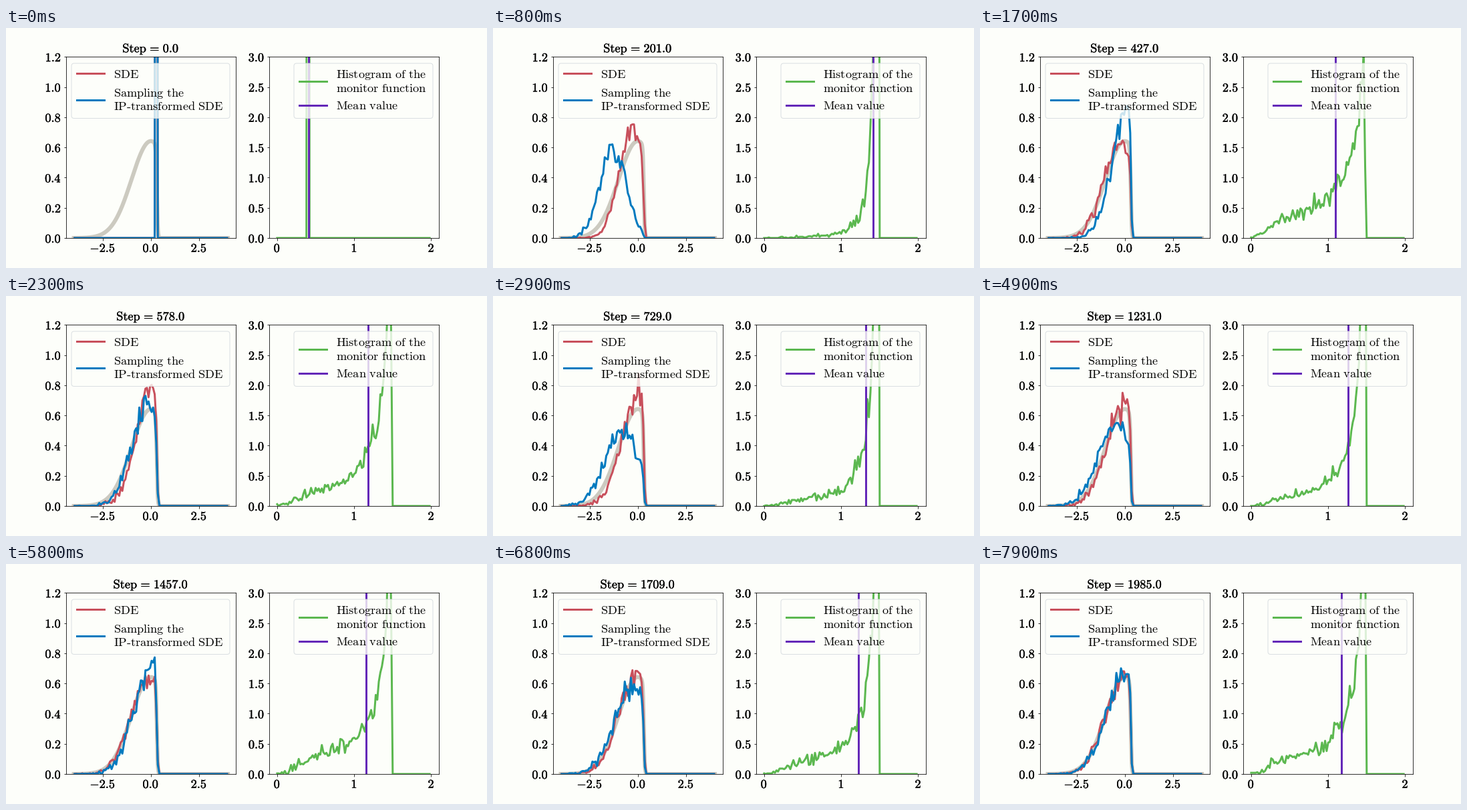
These frames come from a looping animation (720x360 px, 8 s). A matplotlib script:

```python
import matplotlib.pyplot as plt
import numpy as np
from matplotlib import patheffects
from matplotlib.animation import FuncAnimation
from matplotlib.patches import FancyBboxPatch

plt.rcParams["mathtext.fontset"] = "cm"

BG = "#fdfefa"
RED, BLUE, GREEN, PURPLE = "#c8505c", "#007abf", "#5cb850", "#6428b8"
GREY = "#cccac0"
FRAMES, INTERVAL = 80, 100
SAMPLES = 5000
SIZE = 18.3
START = 0.245

grid = np.linspace(-4, 4, 2001)
x_edges = np.linspace(-4, 4, 101)
x_mid = (x_edges[1:] + x_edges[:-1]) / 2
g_edges = np.linspace(0, 2, 101)
wall = np.where(grid < 0.44, 1 / (1 + np.exp((grid - 0.31) / 0.025)), 0)


def swing(step, period, decay, lean, reach):
    """Centre of a cloud that rebounds from the wall and settles at 0."""
    return np.exp(-step / decay) * (reach * np.cos(2 * np.pi * step / period) - lean)


def spread(step):
    return (1 - 0.2 * np.exp(-step / 900)) * (1 - np.exp(-step / 120))


def density(centre, width):
    p = np.exp(-0.5 * ((grid - centre) / width) ** 2) * wall
    return p / (p.sum() * (grid[1] - grid[0]))


def sample(step, rng, **motion):
    if step == 0:
        return np.full(SAMPLES, START)
    cdf = np.cumsum(density(swing(step, **motion), spread(step)))
    return np.interp(rng.random(SAMPLES), cdf / cdf[-1], grid)


def monitor(x):
    return 1.49 - 0.585 * np.exp(2.5 * x)


def hist(values, edges):
    return np.histogram(values, edges)[0] / (len(values) * (edges[1] - edges[0]))


def roman(s):
    s = s.replace(" ", r"\ ").replace("-", r"}\text{-}\mathrm{")
    return r"$\mathrm{%s}$" % s


def step_title(step):
    return r"$\mathrm{Step}\hspace{0.13}=\hspace{0.13}%.1f$" % step


def set_ticks(ax, xs, ys, x_fmt):
    ax.set_xticks(xs, ["$" + x_fmt % v + "$" for v in xs])
    ax.set_yticks(ys, ["$%.1f$" % v for v in ys])
    ax.tick_params(labelsize=SIZE)
    for label in ax.get_xticklabels() + ax.get_yticklabels():
        label.set_path_effects(bold)


def legend(x, width, entries):
    """entries: colour, handle height, [(baseline, text), ...]"""
    over.add_patch(FancyBboxPatch((x + 4, 57), width - 8, 74.5,
                                  boxstyle="round,pad=4,rounding_size=4",
                                  fc=BG, ec="#d2d8dc", lw=1, alpha=0.8))
    for colour, y, lines in entries:
        over.plot([x + 7.5, x + 48.5], [y, y], color=colour, lw=3)
        for base, text in lines:
            over.text(x + 62.8, base, roman(text), fontsize=SIZE,
                      va="baseline", color="black")


bold = [patheffects.withStroke(linewidth=0.35, foreground="black")]
fig, (left, right) = plt.subplots(1, 2, figsize=(10, 5), dpi=72, facecolor=BG)
fig.subplots_adjust(left=0.125, right=0.9, bottom=0.125, top=0.88, wspace=0.2)

for ax in (left, right):
    ax.set_facecolor(BG)
left.set(xlim=(-4.4, 4.4), ylim=(0, 1.2))
right.set(xlim=(-0.1, 2.1), ylim=(0, 3))
set_ticks(left, [-2.5, 0, 2.5], np.arange(7) * 0.2, "%.1f")
set_ticks(right, [0, 1, 2], np.arange(7) * 0.5, "%d")

left.plot(grid, density(0, 1), color=GREY, lw=6)
sde_line, = left.plot([], [], color=RED, lw=3)
ip_line, = left.plot([], [], color=BLUE, lw=3)
hist_line, = right.plot([], [], color=GREEN, lw=3)
mean_line = right.axvline(0, color=PURPLE, lw=3)
title = left.set_title(step_title(0), fontsize=SIZE, pad=6.8, path_effects=bold)

over = fig.add_axes([0, 0, 1, 1], zorder=5)
over.set(xlim=(0, 720), ylim=(360, 0))
over.axis("off")
legend(98, 237, [(RED, 68, [(75, "SDE")]),
                 (BLUE, 108, [(102.5, "Sampling the"),
                              (123, "IP-transformed SDE")])])
legend(431, 208, [(GREEN, 80, [(75, "Histogram of the"),
                               (96, "monitor function")]),
                  (PURPLE, 116, [(122.5, "Mean value")])])


def update(k):
    rng = np.random.default_rng(100 + k)
    step = round(k * 5000 / 199)
    sde = sample(step, rng, period=640, decay=500, lean=0.1, reach=0.9)
    ip = sample(step, rng, period=485, decay=900, lean=0.55, reach=1.25)
    values = monitor(ip)
    sde_line.set_data(x_mid, hist(sde, x_edges))
    ip_line.set_data(x_mid, hist(ip, x_edges))
    hist_line.set_data(g_edges[:-1], hist(values, g_edges))
    mean_line.set_xdata([values.mean()] * 2)
    title.set_text(step_title(step))
    return sde_line, ip_line, hist_line, mean_line, title


anim = FuncAnimation(fig, update, frames=FRAMES, interval=INTERVAL, repeat=True)
plt.show()
```
